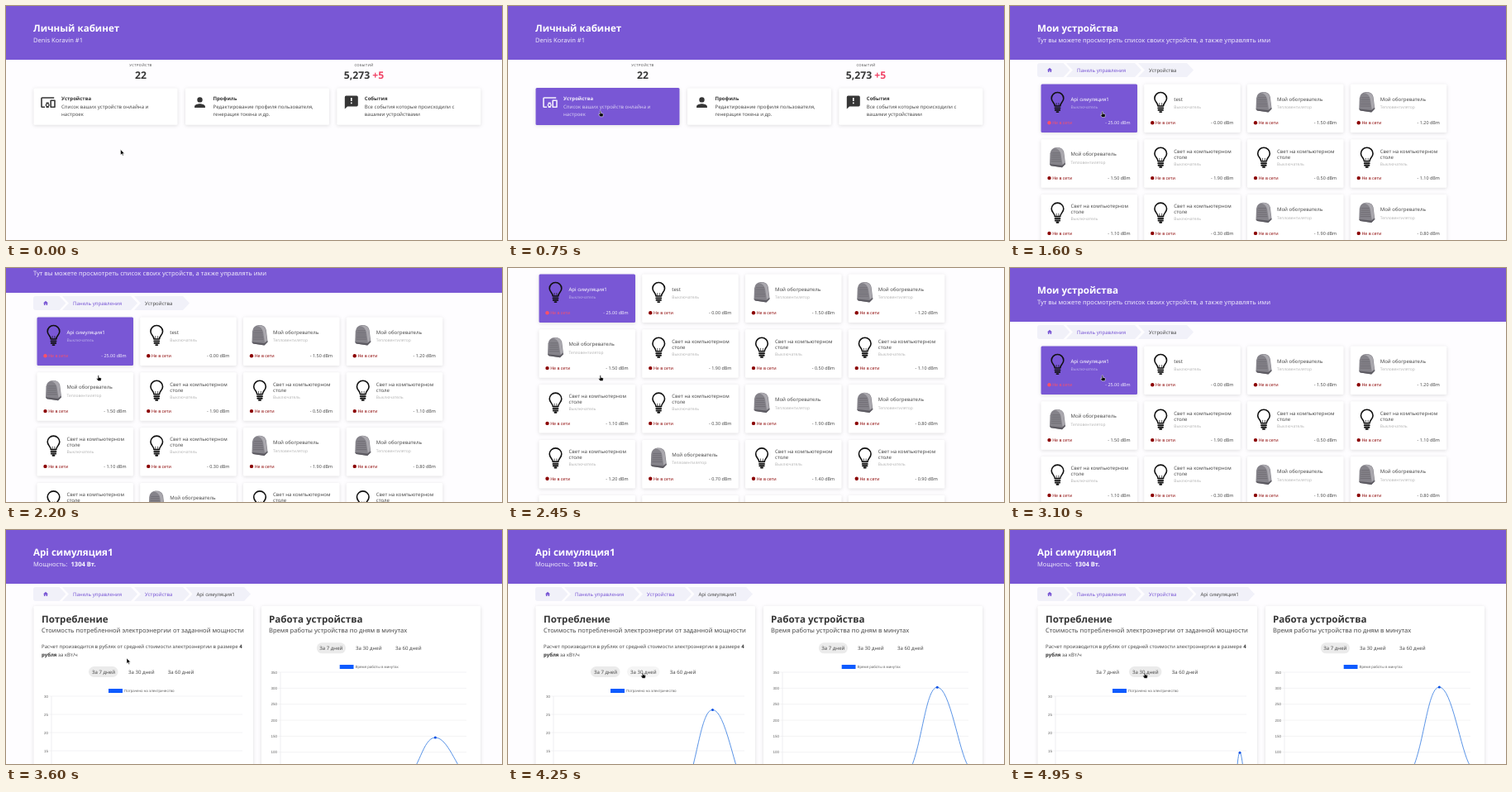
An HTML page for the animation above (5000 ms loop, 600 by 283 pixels).

```html
<!DOCTYPE html>
<html lang="ru">
<head>
<meta charset="utf-8">
<title>Личный кабинет</title>
<style>
  html, body { margin: 0; height: 100%; overflow: hidden; background: #fefdff; }
  svg { display: block; width: 100vw; height: 100vh; }
  text { font: 6.04px "Noto Sans", sans-serif; fill: #4a4a4a; text-rendering: geometricPrecision; white-space: pre; }
  .title { font-size: 11.6px; font-weight: 600; fill: #363636; }
  .count { font-size: 12.2px; font-weight: 600; fill: #363636; }
  .sub { font-size: 7.55px; }
  .bold { font-weight: 700; fill: #363636; }
  .tiny { font-size: 4.15px; letter-spacing: .38px; }
  .kind { font-size: 4.9px; fill: #b5b5b5; }
  .stat { font-size: 5.285px; font-weight: 500; }
  .power { font-size: 5.45px; }
  .axis { font: 4.53px "Liberation Sans", Arial, sans-serif; fill: #666; }
  .end { text-anchor: end; }
  .mid { text-anchor: middle; }
  .card { fill: #fff; filter: drop-shadow(0 1.8px 2.2px rgba(10, 10, 10, .13)); }
</style>
</head>
<body>
<svg id="stage" viewBox="0 0 600 283"></svg>
<script>
const LOOP = 5000, PURPLE = '#7957d5', INK = '#363636', GREY = '#4a4a4a', BLUE = '#0d5bff';
const DEVICES_AT = 1000, CARDS_AT = 1150, DETAIL_AT = 3350, CLICK_AT = 4650, RELOAD_AT = 4770;

const text = (x, y, s, cls = '', fill = '') =>
  `<text x="${x}" y="${y}" class="${cls}"${fill && ` style="fill:${fill}"`}>${s}</text>`;
const rect = (x, y, w, h, fill, r = 0, extra = '') =>
  `<rect x="${x}" y="${y}" width="${w}" height="${h}" rx="${r}" fill="${fill}" ${extra}/>`;
const card = (x, y, w, h) => rect(x, y, w, h, '#fff', 1.5, 'class="card"');
const group = (id, body, attrs = '') => `<g id="${id}" ${attrs}>${body}</g>`;
const header = (title, sub) => rect(0, 0, 600, 65, PURPLE) +
  text(33, 31, title, 'title', '#fff') + text(33, 43.5, sub, 'sub', '#efeafa');

// Dashboard
const icons = {
  devices: 'M3 6h18V4H3c-1.1 0-2 .9-2 2v12c0 1.1.9 2 2 2h4v-2H3zM13 12H9v1.8a3 3 0 0 0 0 4.4V20h4v-1.8a3 3 0 0 0 0-4.4zM11 17.5a1.5 1.5 0 1 1 0-3 1.5 1.5 0 0 1 0 3zM22 8h-6q-1 0-1 1v10q0 1 1 1h6q1 0 1-1V9q0-1-1-1zM21 18h-4v-8h4z',
  person: 'M12 12a4 4 0 1 0 0-8 4 4 0 0 0 0 8zM12 14c-2.7 0-8 1.3-8 4v2h16v-2c0-2.7-5.3-4-8-4z',
  events: 'M20 2H4Q2 2 2 4v18l4-4h14q2 0 2-2V4q0-2-2-2zM13 14h-2v-2h2zM13 10h-2V5h2z'
};
const tileBody = (x, icon, lines, main, soft) =>
  `<path transform="translate(${x + 7.9} 107) scale(.8)" fill-rule="evenodd" fill="${main}" d="${icons[icon]}"/>` +
  lines.map((s, i) => text(x + 33.5, [114, 123.6, 133.3][i], s, i ? '' : 'bold', i ? soft : main)).join('');
const tiles = [
  [33.5, 'devices', ['Устройства', 'Список ваших устройств онлайна и', 'настроек']],
  [217, 'person', ['Профиль', 'Редактирование профиля пользователя,', 'генерация токена и др.']],
  [400.3, 'events', ['События', 'Все события которые происходили с', 'вашими устройствами']]
];
const dashboard = header('Личный кабинет', 'Denis Koravin #1') +
  text(163, 72.7, 'УСТРОЙСТВ', 'tiny mid') + text(163, 88.4, '22', 'count mid') +
  text(433, 72.7, 'СОБЫТИЙ', 'tiny mid') +
  text(433, 88.4, '5,273 <tspan fill="#f14668">+5</tspan>', 'count mid') +
  tiles.map(t => card(t[0], 99.5, 174, 44.3) + tileBody(...t, INK, GREY)).join('') +
  group('tileHover', rect(33.5, 99, 174, 45, PURPLE, 1.5) + tileBody(...tiles[0], '#f3effc', '#d9cff2'));

// Breadcrumb: each part spans from its left edge to the base of its tip
const crumbs = labels => {
  const spans = [[33, 64.5], [68, 151], [155, 214], [217.5, 288]];
  return ['', ...labels].map((label, i) => {
    const [a, b] = spans[i], last = i === labels.length;
    const left = i ? `L${a} 86L${a + 8} 77.5L${a} 69` : `H36Q33 86 33 83V72Q33 69 36 69`;
    return `<path fill="#f1f1f9" d="M${i ? a : 36} 69H${b}L${b + 8} 77.5L${b} 86${left}Z"/>` +
      text(a + 13, 79.7, label, '', last ? GREY : PURPLE);
  }).join('') + `<path fill="${PURPLE}" d="M48 74.8L45 77.5H45.9V80H47.4V78.2H48.6V80H50.1V77.5H51Z"/>`;
};

// Device list
const bulb = `<g fill="none" stroke="#111" stroke-width="1.6" stroke-linecap="round" stroke-linejoin="round">
  <path d="M16.7 26.5C16.7 22.5 12.7 21.5 12.7 17.2A7.3 7.2 0 0 1 27.3 17.2C27.3 21.5 23.3 22.5 23.3 26.5Z"/>
  <path d="M18.6 26V23M21.4 26V23" stroke-width=".7"/>
  <path d="M17 29H23M17.3 31.4H22.7M19 33.6H21" stroke-width="1.9"/></g>`;
const heater = `<path fill="#85838a" d="M10.5 30.5L11 17Q12 10.2 18.5 9.6Q26.3 9.2 27.8 15.5L29.6 29.8L25.5 34L12 32Z"/>
  <path fill="#aaa8ae" d="M16 10.4Q25.5 8.5 27.2 15.5L28.8 28L26 30.5L24 17.5Q22.5 11.5 16 10.4Z"/>
  <path stroke="#67656c" stroke-width=".7" d="M13 16.5H23M12.7 19H23.3M12.5 21.5H23.7M12.3 24H24.1M12.1 26.5H24.5"/>
  <path fill="#5d5b62" d="M10.5 30L25.5 31.5L29.5 28.8V30L25.5 34L12 32Z"/>`;
const kinds = {
  A: [bulb, ['Api симуляция1'], 'Выключатель'],
  T: [bulb, ['test'], 'Выключатель'],
  L: [bulb, ['Свет на компьютерном', 'столе'], 'Выключатель'],
  H: [heater, ['Мой обогреватель'], 'Тепловентилятор']
};
const deviceBody = (kind, power, [name, soft, state, value]) => {
  const [icon, lines, type] = kinds[kind], two = lines.length > 1;
  return icon + lines.map((s, i) => text(36, (two ? 16.4 : 20) + 7 * i, s, '', name)).join('') +
    text(36, two ? 31.4 : 29.6, type, 'kind', soft) +
    `<circle cx="10" cy="46.8" r="2.2" fill="${state}"/>` +
    text(13.7, 48.7, 'Не в сети', 'stat', state) +
    text(108.2, 48.7, `- ${power} dBm`, 'power end', value);
};
const plain = [GREY, '#b5b5b5', '#8b0000', GREY], lit = ['#fff', '#b9abea', '#fb5069', '#f1ecfb'];
const rows = [
  'A25.00 T0.00 H1.50 H1.20', 'H1.50 L1.90 L0.50 L1.10', 'L1.10 L0.30 H1.90 H0.80',
  'L1.20 H0.70 L1.40 L0.90', 'H1.10 L0.60 H1.30 L1.70'
];
const deviceCards = rows.map((row, r) => row.split(' ').map((d, c) =>
  `<g transform="translate(${37.5 + 124.75 * c} ${94.5 + 66.8 * r})">` +
  card(0, 0, 116.5, 58.5) + deviceBody(d[0], d.slice(1), plain) +
  (r + c ? '' : group('deviceHover', rect(0, 0, 116.5, 58.5, PURPLE, 1.5) + deviceBody('A', '25.00', lit))) +
  '</g>').join('')).join('');
const devices = header('Мои устройства', 'Тут вы можете просмотреть список своих устройств, а также управлять ими') +
  crumbs(['Панель управления', 'Устройства']) + group('cards', deviceCards);

// Device page
const periods = (xs, y) => xs.map((x, i) => text(x, y, `За ${[7, 30, 60][i]} дней`)).join('');
const grid = (axisX, right, top, gap, max, step) => {
  let out = `<path stroke="#dcdce0" stroke-width=".5" d="M${axisX} ${top}V283"/>`;
  for (let y = top, v = max; y < 283; y += gap, v -= step)
    out += `<path stroke="#e6e6e9" stroke-width=".5" d="M${axisX - 3.5} ${y}H${right}"/>` +
      text(axisX - 4, y + 1.6, v, 'axis end');
  return out;
};
const line = id => `<path id="${id}Line" fill="none" stroke="#2f78e0" stroke-width=".8"/>` +
  `<circle id="${id}Dot" r="1.5" fill="#0d50e6"/>`;
const detail = header('Api симуляция1', 'Мощность: <tspan x="78.5" font-weight="700" fill="#fff">1304 Вт.</tspan>') +
  crumbs(['Панель управления', 'Устройства', 'Api симуляция1']) +
  card(33.5, 92, 265.5, 220) + card(309, 92, 265, 220) +
  text(43, 112, 'Потребление', 'title') +
  text(43, 124, 'Стоимость потребленной электроэнергии от заданной мощности', 'sub') +
  text(43, 143.2, 'Расчет производится в рублях от средней стоимости электроэнергии в размере <tspan class="bold">4</tspan>') +
  text(43, 152.8, '<tspan class="bold">рубля</tspan> за кВт/ч') +
  rect(100, 165, 35.5, 13, '#ebebeb', 6.5, 'id="week"') + rect(144, 165, 39.5, 13, '#f5f5f5', 6.5, 'id="month"') +
  periods([104, 148, 195.8], 173.8) +
  rect(124, 192, 17, 5, BLUE) + text(143, 196, 'Потрачено на электричество', 'axis') +
  grid(55, 286, 201, 22, 30, 5) + line('cost') +
  text(318, 112, 'Работа устройства', 'title') +
  text(318, 124, 'Время работы устройства по дням в минутах', 'sub') +
  rect(375.8, 136.3, 35.2, 13, '#ebebeb', 6.5) + periods([379.3, 423, 471], 145.2) +
  rect(403.7, 163, 16.8, 5, BLUE) + text(422.5, 167, 'Время работы в минутах', 'axis') +
  grid(332, 557, 172, 19.35, 350, 50) + line('work');

const pointers = `<g id="pointer" stroke="#fff" stroke-width=".5" fill="#000" stroke-linejoin="round">
  <path id="arrow" d="M0 0V6.5L1.5 5.2L2.6 7.4L3.6 6.9L2.6 4.8H4.6Z"/>
  <path id="hand" d="M-.7 .6A.7 .7 0 0 1 .7 .6V2.6L3 3.1Q3.6 3.3 3.5 4L3 6.8H-.4L-2.2 4.3Q-2.4 3.4 -1.6 3.5L-.7 4.2Z"/></g>`;

const $ = id => document.getElementById(id);
$('stage').innerHTML = group('dashboard', dashboard) + group('devices', devices) + group('detail', detail) + pointers;

const clamp = v => Math.min(1, Math.max(0, v));
const phase = (t, start, length) => clamp((t - start) / length);
const smooth = p => p * p * (3 - 2 * p);
const easeOutQuart = p => 1 - (1 - p) ** 4;
const show = (id, on) => $(id).setAttribute('visibility', on ? 'inherit' : 'hidden');

// Pointer stops: time, x, y
const stops = [[50, 138.6, 173.6], [600, 111.8, 127], [1500, 111.8, 127.5], [2100, 111.8, 129.8],
  [DETAIL_AT, 111.8, 129.8], [3600, 146, 155], [4200, 163, 172.5]];
function pointerAt(t) {
  let [, x, y] = stops[0];
  for (let i = 1; i < stops.length; i++) {
    const [t0, x0, y0] = stops[i - 1], [t1, x1, y1] = stops[i];
    const p = smooth(phase(t, t0, t1 - t0));
    x += (x1 - x0) * p;
    y += (y1 - y0) * p;
  }
  return [x, y];
}

// One peak between neighbouring days, growing from the base line
function plot(id, x, day, base, height) {
  const at = (dx, h) => `${x + dx * day} ${base - h * height}`;
  $(id + 'Line').setAttribute('d', `M${at(-1, .08)}C${at(-.51, .3)} ${at(-.41, 1)} ${at(0, 1)}` +
    `C${at(.41, 1)} ${at(.7, .335)} ${at(1, .19)}`);
  $(id + 'Dot').setAttribute('cx', x);
  $(id + 'Dot').setAttribute('cy', base - height);
}

function draw(t) {
  show('dashboard', t < DEVICES_AT);
  show('devices', t >= DEVICES_AT && t < DETAIL_AT);
  show('detail', t >= DETAIL_AT);
  show('cards', t >= CARDS_AT && t < DETAIL_AT);
  $('tileHover').setAttribute('opacity', smooth(phase(t, 400, 330)));
  $('deviceHover').setAttribute('opacity', smooth(phase(t, 1300, 300)));
  const scroll = Math.round(91.5 * Math.sin(Math.PI * phase(t, 2050, 706)) ** 2);
  $('devices').setAttribute('transform', `translate(0 ${-scroll})`);

  const [x, y] = pointerAt(t), onDetail = t >= DETAIL_AT;
  const hand = onDetail ? y > 165 : y < 144.5;
  $('pointer').setAttribute('transform', `translate(${x} ${y})`);
  show('hand', hand);
  show('arrow', !hand);
  $('week').setAttribute('opacity', t < CLICK_AT ? 1 : 0);
  $('month').setAttribute('opacity', onDetail && hand ? 1 : 0);
  $('month').setAttribute('fill', t < CLICK_AT ? '#f5f5f5' : '#ebebeb');

  plot('work', 519.3, 37.3, 307.5, 117.5 * easeOutQuart(phase(t, 3450, 1000)));
  const month = t >= RELOAD_AT;
  plot('cost', month ? 278 : 247.5, month ? 8 : 38.5, 333,
    116 * easeOutQuart(phase(t, month ? RELOAD_AT : 3495, 1000)));
}

function tick() {
  draw(performance.now() % LOOP);
  requestAnimationFrame(tick);
}
tick();
</script>
</body>
</html>
```
